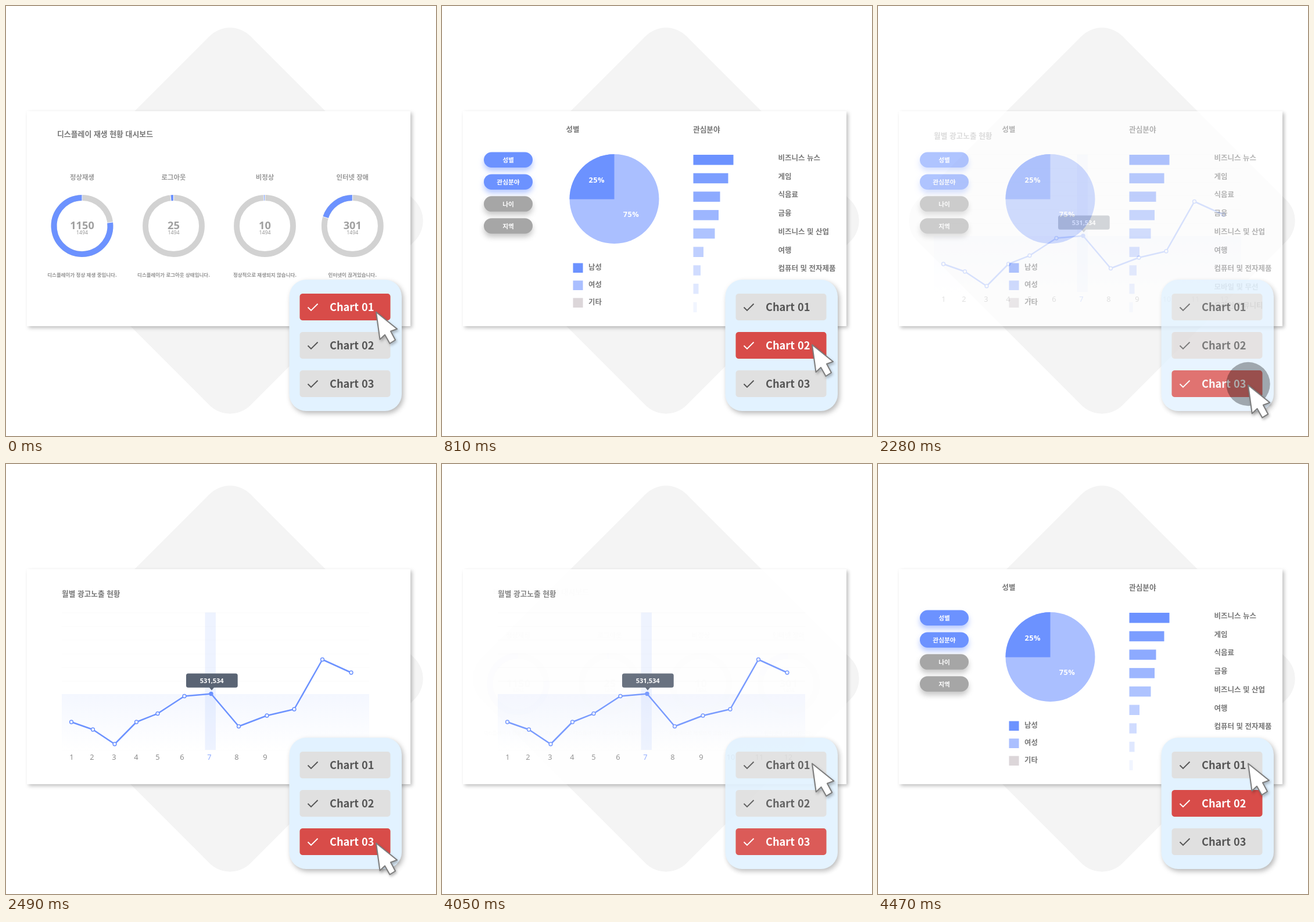
An HTML page for the animation above (4.92 s loop, 740x740 px).

```html
<!DOCTYPE html>
<html lang="ko">
<head>
<meta charset="utf-8">
<style>
html, body { margin: 0; width: 100%; height: 100%; overflow: hidden; background: #fff; }
svg { display: block; width: 740px; height: 740px; font-family: "Noto Sans CJK KR", "Noto Sans CJK", sans-serif; }
.num { font-family: "Noto Sans", sans-serif; }
.b { font-weight: 700; }
.mid { text-anchor: middle; }
.card { filter: drop-shadow(3px 3px 3px rgba(0,0,0,.25)); }
.panel { filter: drop-shadow(3px 4px 4px rgba(0,0,0,.28)); }
#arrow { filter: drop-shadow(2px 3px 2px rgba(0,0,0,.25)); }
</style>
</head>
<body>
<svg viewBox="0 0 740 740">
  <defs>
    <linearGradient id="fade" x2="0" y2="1">
      <stop stop-color="#f4f7ff"/><stop offset="1" stop-color="#fff"/>
    </linearGradient>
  </defs>
  <rect x="136" y="120" width="499" height="499" rx="50" fill="#f4f4f4" transform="rotate(45 385.5 369.5)"/>
  <g id="scenes"></g>
  <g id="panel"></g>
  <circle id="ripple" cx="637"/>
  <path id="arrow" d="M0 0L36 29 25 33 33 48 23.5 54 15 39 6.5 47Z" fill="#fff" stroke="#7d7d7d" stroke-width="2" stroke-linejoin="round"/>
</svg>
<script>
const BLUE = '#6c92ff', PALE = '#aabfff';
const $ = id => document.getElementById(id);
const clamp = v => Math.max(0, Math.min(1, v));
const rect = (x, y, w, h, fill, more = '') =>
  `<rect x="${x}" y="${y}" width="${w}" height="${h}" fill="${fill}" ${more}/>`;
const text = (x, y, size, fill, str, cls = 'b', more = '') =>
  `<text x="${x}" y="${y}" font-size="${size}" fill="${fill}" class="${cls}" ${more}>${str}</text>`;
const each = (list, fn) => list.map(fn).join('');

// Donut gauge: the blue share runs counter-clockwise from the top
function gauge([x, name, count, note]) {
  const share = count / 1494, r = 48.5, turn = 2 * Math.PI * r;
  const gap = a => `<path d="M${x} 324V336" stroke="#fff" transform="rotate(${a} ${x} 378.5)"/>`;
  const ring = (color, more) =>
    `<circle cx="${x}" cy="378.5" r="${r}" fill="none" stroke="${color}" stroke-width="9.8" ${more}/>`;
  return text(x, 299, 11.4, '#999', name, 'b mid')
    + ring('#d2d2d2', '')
    + ring(BLUE, `stroke-dasharray="${share * turn} ${turn}" transform="rotate(${-90 - 360 * share} ${x} 378.5)"`)
    + gap(0) + gap(-360 * share)
    + text(x, 384, 18.2, '#a0a0a0', count, 'num b mid')
    + text(x, 393, 8.8, '#999', 1494, 'num mid')
    + text(x, 466, 8.5, '#929292', note, 'b mid');
}

function gauges() {
  return text(88, 225, 12.9, '#777', '디스플레이 재생 현황 대시보드') + each([
    [131, '정상재생', 1150, '디스플레이가 정상 재생 중입니다.'],
    [288.5, '로그아웃', 25, '디스플레이가 로그아웃 상태입니다.'],
    [445.5, '비정상', 10, '정상적으로 재생되지 않습니다.'],
    [596.3, '인터넷 장애', 301, '인터넷이 끊겨있습니다.']
  ], gauge);
}

function audience() {
  const widths = [69, 60, 46, 43.5, 37, 17.5, 12.5, 9, 6];
  const topics = ['비즈니스 뉴스', '게임', '식음료', '금융', '비즈니스 및 산업', '여행',
    '컴퓨터 및 전자제품', '모바일 및 무선', '온라인 커뮤니티'];
  const pill = (name, i) => {
    const y = 251.5 + 37.9 * i, on = i < 2;
    const glow = on ? 'rgba(108,146,255,.5)' : 'rgba(0,0,0,.22)';
    return rect(72, y, 84, 26.5, on ? BLUE : '#a6a6a6', `rx="13.25" style="filter:drop-shadow(0 6px 5px ${glow})"`)
      + text(114, y + 17.3, 10.7, '#fff', name, 'b mid');
  };
  return text(213.5, 217, 12.5, '#777', '성별') + text(432, 217, 12.7, '#777', '관심분야')
    + each(['성별', '관심분야', '나이', '지역'], pill)
    + `<circle cx="296.5" cy="332" r="77" fill="${PALE}"/>`
    + `<path d="M296.5 332.5V255A77 77 0 0 0 219.5 332.5Z" fill="${BLUE}"/>`
    + text(266.3, 304, 12.8, '#fff', '25%', 'num b mid', 'letter-spacing=".4"')
    + text(325.5, 363, 12.8, '#fff', '75%', 'num b mid', 'letter-spacing=".4"')
    + each([['남성', BLUE], ['여성', PALE], ['기타', '#dcd6d9']], ([name, color], i) =>
      rect(225.5, 442.5 + 30 * i, 17, 16.5, color) + text(252, 454 + 30.2 * i, 12.4, '#777', name))
    + each(widths, (w, i) =>
      rect(432.5, 256 + 31.7 * i, w, 17.5, BLUE, `opacity="${1 - .113 * i}"`)
      + text(578.5, 266 + 31.7 * i, 12.5, '#777', topics[i]));
}

function exposure() {
  const pts = [[112.5, 444], [149.5, 457], [187, 482], [224.5, 444], [261, 429.5], [307, 399.5],
    [353, 395.5], [400.5, 451.5], [449, 433], [496, 422], [544.5, 336.5], [594, 359]];
  const ticks = [113, 148, 186, 224, 261, 303, 350, 397, 446, 497, 546, 596];
  return text(96, 228, 12.7, '#777', '월별 광고노출 현황')
    + each(Array.from({ length: 11 }, (_, i) => 255.5 + 23.6 * i), y => rect(96, y, 529, 1, '#fcfcfc'))
    + rect(96, 396, 529, 96, 'url(#fade)')
    + rect(342.5, 255.5, 18.5, 236.5, BLUE, 'opacity=".115"')
    + `<polyline points="${pts}" fill="none" stroke="${BLUE}" stroke-width="2.5" stroke-linejoin="round"/>`
    + each(pts, ([x, y], i) =>
      `<circle cx="${x}" cy="${y}" r="2.9" fill="${i == 6 ? BLUE : '#fff'}" stroke="${BLUE}" stroke-width="1.5"/>`)
    + each(ticks, (x, i) => text(x, 509, 12.8, i == 6 ? '#8aa8ff' : '#8c8c8c', i + 1, 'num mid'))
    + rect(310, 360.5, 88.7, 24.3, '#5a6474', 'rx="3.5"')
    + '<path d="M349.5 384H358.5L354 389.5Z" fill="#5a6474"/>'
    + text(354.2, 377, 11, '#fff', '531,534', 'num mid', 'font-weight="600"');
}

const buttonY = [495, 561, 627];
const tipY = [515.5, 583, 652.5];

$('scenes').innerHTML = each([gauges, audience, exposure],
  draw => `<g>${rect(36, 181, 660, 370, '#fff', 'class="card"')}${draw()}</g>`);
const scenes = [...$('scenes').children];

const button = (y, i, fill, ink) => rect(505.5, y, 156, 46, fill, 'rx="5"')
  + `<path d="M519.5 518.5L525 524 536.5 512.5" transform="translate(0 ${y - 495})" fill="none" stroke="${ink}" stroke-width="1.9"/>`
  + text(557, y + 30, 18.2, ink, 'Chart 0' + (i + 1));
$('panel').innerHTML = rect(487.5, 471, 193.5, 226, '#e2f2ff', 'rx="29" class="panel"')
  + each(buttonY, (y, i) => button(y, i, '#e0e0e0', '#555')
    + `<g class="lit">${button(y, i, '#d84c49', '#fff')}</g>`);
const lit = [...document.querySelectorAll('.lit')];

const LOOP = 4920, STEP = 30;
// Cursor travel: start, end, from row, to row
const moves = [[-30, 150, 0, 1], [1470, 1650, 1, 2], [3270, 3540, 2, 0]];
// Dissolves: click time, start, end
const dissolves = [[360, 345, 810], [1980, 2100, 2490], [4020, 4005, 4470]];

function render(now) {
  const t = Math.floor(now % LOOP / STEP) * STEP;

  const mt = t >= LOOP - STEP ? t - LOOP : t;
  const [m0, m1, a, b] = moves.findLast(m => mt >= m[0]);
  const y = tipY[a] + (tipY[b] - tipY[a]) * clamp((mt - m0) / (m1 - m0));

  let from = dissolves.findIndex(d => t < d[2]);
  if (from < 0) from = 0;
  const to = (from + 1) % 3;
  const [click, start, end] = dissolves[from];
  const p = t > dissolves[2][2] ? 0 : clamp((t - start) / (end - start));
  const shown = 1 - p, rising = Math.min(1, 1.2 * p);

  scenes.forEach((s, i) => s.setAttribute('opacity', i == from ? shown : i == to ? rising : 0));
  $('scenes').append(scenes[from]);
  $('panel').setAttribute('opacity', 1 - p * (1 - rising));

  const swap = clamp((p - .1) / .37);
  lit.forEach((g, i) => g.setAttribute('opacity', i == from ? 1 - swap : i == to ? swap : 0));

  const u = clamp((p - .1) / .9);
  $('ripple').setAttribute('cy', buttonY[to] + 23.5);
  $('ripple').setAttribute('r', 48 * (1 - (1 - u) ** 3));
  $('ripple').setAttribute('opacity', .53 * (1 - u));

  const press = 1 + .13 * Math.sin(Math.PI * clamp((t - click) / 330));
  $('arrow').setAttribute('transform', `translate(637 ${y}) scale(${press})`);
  requestAnimationFrame(tick);
}

let origin;
function tick(now) {
  origin ??= now;
  render(now - origin);
}
render(0);
</script>
</body>
</html>
```
